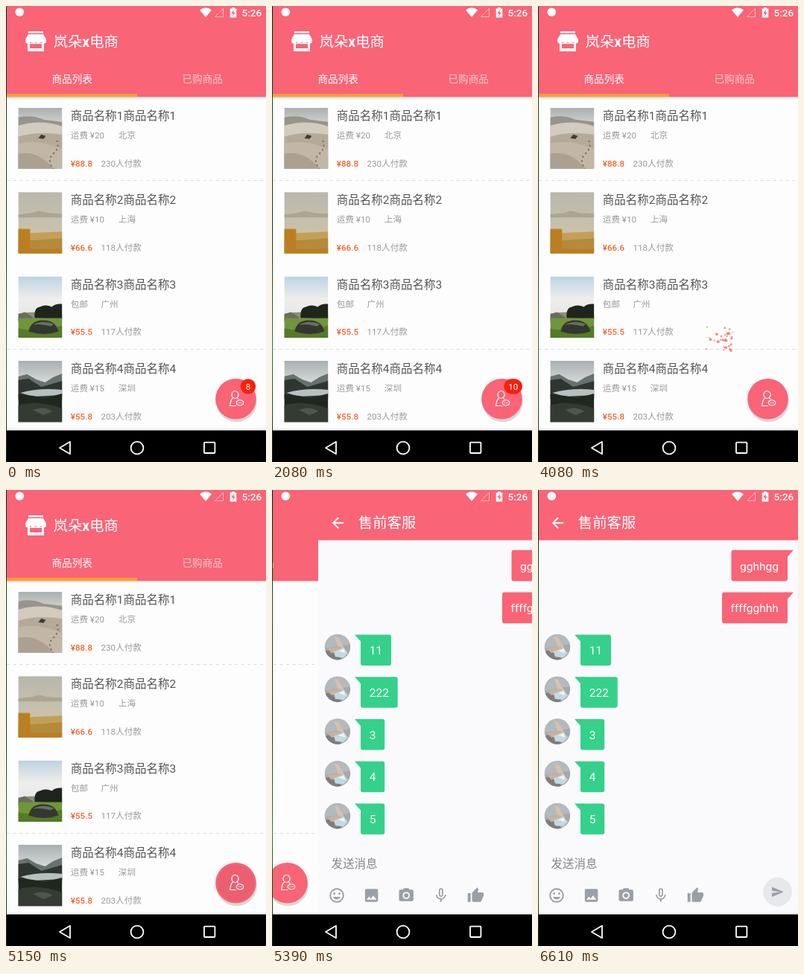
An HTML page for the animation above (8 s loop, 349 px wide and 613 px high).

```html
<!DOCTYPE html>
<html lang="zh-CN">
<head>
<meta charset="utf-8">
<title>Shop and chat</title>
<style>
html, body { margin: 0; width: 100%; height: 100%; overflow: hidden; background: #000; }
svg { display: block; width: 100%; height: 100%; }
text { font-family: Roboto, "Noto Sans CJK SC", "Noto Sans CJK", sans-serif; white-space: pre; }
</style>
</head>
<body>
<svg id="stage" viewBox="0 0 349 613" xmlns="http://www.w3.org/2000/svg"></svg>
<script>
const LOOP = 8000, W = 350;
const PINK = '#f96476', GREEN = '#35d18a', RED = '#f6210c', ICON = '#9a9fa8';

const rect = (x, y, w, h, fill, more = '') =>
  `<rect x="${x}" y="${y}" width="${w}" height="${h}" fill="${fill}" ${more}/>`;
const circle = (x, y, r, fill, more = '') =>
  `<circle cx="${x}" cy="${y}" r="${r}" fill="${fill}" ${more}/>`;
const path = (d, fill, more = '') => `<path d="${d}" fill="${fill}" ${more}/>`;
const line = (d, color, width, more = '') =>
  path(d, 'none', `stroke="${color}" stroke-width="${width}" ${more}`);
const text = (x, y, size, fill, str, more = '') =>
  `<text x="${x}" y="${y}" font-size="${size}" fill="${fill}" ${more}>${str}</text>`;
const group = (x, y, body, more = '') => `<g transform="translate(${x} ${y})" ${more}>${body}</g>`;

// 24-unit glyph centred on x, y
const glyph = (x, y, scale, fill, d) =>
  path(d, fill, `fill-rule="evenodd" transform="translate(${x} ${y}) scale(${scale}) translate(-12 -12)"`);

const glyphs = {
  back: 'M20 11H7.83l5.59-5.59L12 4l-8 8 8 8 1.41-1.41L7.83 13H20z',
  smile: 'M12 2a10 10 0 1 0 .01 0zM12 4a8 8 0 1 1-.01 0zM15.5 8a1.5 1.5 0 1 0 .01 0zM8.5 8a1.5 1.5 0 1 0 .01 0zM12 17.5c2.33 0 4.31-1.46 5.11-3.5H6.89c.8 2.04 2.78 3.5 5.11 3.5z',
  image: 'M21 19V5c0-1.1-.9-2-2-2H5c-1.1 0-2 .9-2 2v14c0 1.1.9 2 2 2h14c1.1 0 2-.9 2-2zM8.5 13.5l2.5 3L14.5 12l4.5 6H5z',
  camera: 'M9 2L7.17 4H4c-1.1 0-2 .9-2 2v12c0 1.1.9 2 2 2h16c1.1 0 2-.9 2-2V6c0-1.1-.9-2-2-2h-3.17L15 2zM12 7a5 5 0 1 1-.01 0zM12 8.8a3.2 3.2 0 1 0 .01 0z',
  mic: 'M12 14c1.66 0 3-1.34 3-3V5a3 3 0 0 0-6 0v6c0 1.66 1.34 3 3 3zM10.8 4.9a1.2 1.2 0 0 1 2.4 0v6.2a1.2 1.2 0 0 1-2.4 0zM17.3 11c0 3-2.54 5.1-5.3 5.1S6.7 14 6.7 11H5c0 3.41 2.72 6.23 6 6.72V21h2v-3.28c3.28-.48 6-3.3 6-6.72z',
  thumb: 'M1 21h4V9H1zM23 10c0-1.1-.9-2-2-2h-6.31l.95-4.57c.1-.5-.1-1-.41-1.38L14.17 1 7.59 7.59C7.22 7.95 7 8.45 7 9v10c0 1.1.9 2 2 2h9c.83 0 1.54-.5 1.84-1.22l3.02-7.05c.09-.23.14-.47.14-.73z',
  send: 'M2 21L23 12 2 3v7l15 2-15 2z'
};

const fade = (id, ...colors) => `<linearGradient id="${id}" x2="0" y2="1">` +
  colors.map((c, i) => `<stop offset="${i / (colors.length - 1)}" stop-color="${c}"/>`).join('') +
  '</linearGradient>';

const defs = `<defs>
  ${fade('drop', '#0003', '#0000')}
  ${fade('edge', '#0b2a12', '#184f1e', '#0d3b16', '#2a7a2c', '#0b2a12')}
  ${fade('sand', '#a9afb0', '#d8d6d0')}
  ${fade('haze', '#b9b6ac', '#c5c0ae', '#d6c59a')}
  ${fade('cloud', '#bcd3e2', '#eeeeec', '#e4e4e2')}
  ${fade('storm', '#a9afb1', '#e6e8e8')}
  <clipPath id="photo"><rect width="59" height="82.5"/></clipPath>
  <clipPath id="face"><circle r="17.2"/></clipPath>
  <filter id="soft" x="-30%" y="-30%" width="160%" height="160%"><feGaussianBlur stdDeviation=".7"/></filter>
</defs>`;

const photos = [
  rect(0, 0, 59, 24, 'url(#sand)') +
    path('M0 13Q18 9 34 16L59 19V82H0z', '#98948b') +
    path('M0 24Q30 15 59 25V82H0z', '#d2cbbe') +
    path('M0 39Q22 31 59 36V82H0z', '#b5aa99') +
    path('M0 48Q30 42 59 56V82H0z', '#c2b7a6') +
    path('M0 62Q26 56 48 82H0z', '#aca191') +
    path('M27 41l4-5 6 2-3 4z', '#3f3b36') +
    line('M52 44Q56 54 47 62T47 82', '#6f675b', 2, 'stroke-dasharray="2 4"'),
  rect(0, 0, 59, 82.5, 'url(#haze)') +
    path('M0 30L18 28 27 25 40 28 59 29V34H0z', '#aba591') +
    path('M0 49H15V55L59 53V82H0z', '#c3a057') +
    path('M0 66L59 62V82.5H0z', '#b48a3d') +
    path('M0 50H16V76H59V82.5H0z', '#bb7f22'),
  rect(0, 0, 59, 60, 'url(#cloud)') +
    path('M0 50Q20 46 59 50V62H0z', '#8a927a') +
    path('M22 56Q21 42 29 41 37 37 45 41 50 36 59 37V57z', '#1f251c') +
    path('M0 51L9 48 20 55V60H0z', '#6b6b60') +
    rect(0, 56, 59, 27, '#6f963a') +
    path('M0 70Q30 76 59 66V82.5H0z', '#547a2a') +
    path('M14 74Q16 61 30 59 50 57 54 74 34 81 14 74z', '#34372f') +
    path('M20 65Q32 58 48 64L44 67Q30 63 20 65z', '#6c6d62'),
  rect(0, 0, 59, 40, 'url(#storm)') +
    path('M0 21L12 18 24 25 36 29 47 22 59 17V48H0z', '#67716d') +
    path('M0 26L14 24 31 35 59 27V52H0z', '#2e3632') +
    path('M3 43Q28 36 59 39V46L20 48z', '#b9c0c0') +
    path('M0 45L20 47 36 50 59 44V82.5H0z', '#20271f') +
    path('M0 60Q24 52 59 64V82.5H0z', '#343b32') +
    path('M20 66Q34 60 46 68L34 73z', '#4f564c')
];

const goods = [['运费 ¥20', '北京', '¥88.8', 230], ['运费 ¥10', '上海', '¥66.6', 118],
  ['包邮', '广州', '¥55.5', 117], ['运费 ¥15', '深圳', '¥55.8', 203]];

function goodsRow([freight, city, price, sold], i) {
  const name = '商品名称' + (i + 1);
  return group(0, 136.8 + i * 113.4,
    group(16.4, 0, photos[i], 'clip-path="url(#photo)"') +
    text(86.8, 16.2, 15.5, '#555', name + name) +
    text(86.8, 41, 11.6, '#999', freight) +
    text(freight.length > 2 ? 150.8 : 127.5, 41, 11.6, '#999', city) +
    text(86.8, 78.8, 11.6, '#f2652b', price, 'font-weight="500"') +
    text(127.5, 78.8, 11.6, '#999', sold + '人付款'));
}

const dashes = y => line(`M1 ${y}H349`, '#dcdcdc', 1, 'stroke-dasharray="4.5 4"');

const shop = path('M30 34H50V36.5H30zM30 38H50L54 45V47A3.5 3.5 0 0 1 47 47A3.5 3.5 0 0 1 40 47A3.5 3.5 0 0 1 33 47A3.5 3.5 0 0 1 26 47V45z', '#fff') +
  path('M29 50H51V61H29zM32 51V57H48V51z', '#fff', 'fill-rule="evenodd"');

const fab = circle(309.5, 532, 27.3, '#00000026', 'filter="url(#soft)"') +
  circle(308.5, 528.3, 27.3, PINK) +
  '<circle id="ripple" cx="308.5" cy="528.3" fill="#000"/>' +
  line('M307.5 517.5a4.6 5 0 1 0 .01 0zM304.5 527Q301 530 300.8 537.5H309M310.5 527L312 528.5', '#fff', 1.2) +
  line('M314 529.8a5 3.6 0 1 0 .01 0zM311.4 533.4h1M313.6 533.4h1M315.8 533.4h1', '#fff', 1.1);

const home = rect(0, 0, W, 571, '#fdfdfe') +
  goods.map(goodsRow).join('') + dashes(234.5) + dashes(461.5) +
  rect(0, 122, W, 3, 'url(#drop)') + rect(0, 0, W, 122, PINK) + shop +
  text(63.5, 54.5, 19.4, '#fff', '岚朵<tspan font-weight="700">x</tspan>电商') +
  text(61.5, 103, 13.6, '#fff', '商品列表') +
  text(236.5, 103, 13.6, '#fff', '已购商品', 'opacity=".65"') +
  rect(0, 118, 176, 4, '#fc9d33') + fab + '<g id="badge"></g>';

const avatar = y => group(26, y, rect(-18, -18, 36, 36, '#a5a8ac') +
  path('M-18 -18H18V-4L-18 2z', '#b4b9be') +
  path('M-18 6L-2 2 6 18H-18z', '#7f7d7e') +
  path('M-4 -14L1 -13 10 3 3 7z', '#d8c0ab') +
  path('M-14 2L4 -1 8 4 -8 8z', '#cbb19c') +
  path('M-5 6L8 1 14 8 8 14 -3 13z', '#bfdbe3') +
  path('M1 5L9 2 10 8z', '#eef4f5'), 'clip-path="url(#face)"');

const sent = (x, y, str) => rect(x, y, 335 - x, 41.7, PINK, 'rx="3"') +
  path(`M331 ${y}H343L335 ${y + 9}L331 ${y + 9}z`, PINK) +
  text(x + 11.5, y + 26.8, 15.5, '#fff', str);

function received(str, i) {
  const y = 194.4 + i * 56.75;
  return avatar(y + 16.8) + rect(57, y, 23.5 + str.length * 8.75, 41.7, GREEN, 'rx="3"') +
    path(`M49 ${y}H61V${y + 9}H57z`, GREEN) + text(68.8, y + 26.8, 15.5, '#fff', str);
}

const chat = rect(0, 0, W, 571, '#fafafc') + rect(0, 0, W, 67.5, PINK) +
  glyph(26.5, 44.3, .97, '#fff', glyphs.back) +
  text(53.8, 51.3, 19.4, '#fff', '售前客服') +
  sent(259.5, 80.8, 'gghhgg') + sent(247, 137.6, 'ffffgghhh') +
  ['11', '222', '3', '4', '5'].map(received).join('') +
  text(17.5, 507.5, 15.5, '#858585', '发送消息') +
  ['smile', 'image', 'camera', 'mic', 'thumb'].map((name, i) =>
    glyph(25 + i * 46.6, 545, .97, ICON, glyphs[name])).join('') +
  circle(321.5, 540.3, 19.4, '#e7e8ec') + glyph(321.5, 540.3, .75, ICON, glyphs.send) +
  '<rect id="bar" x="345" y="350" width="4" height="123" fill="#000"/>';

const status = circle(18.3, 8.2, 5.8, '#fff') +
  path('M260 5.5Q268 -1 276 5.5L268 15z', '#fff') +
  line('M291.5 3.5V14.5H280.5z', '#fff', 1, 'opacity=".55"') +
  path('M303 2H307V3.5H309.3V15.5H300.7V3.5H303zM305.8 5L302.5 10H304.5V14L307.6 8.8H305.6z', '#fff', 'fill-rule="evenodd"') +
  text(316.5, 13.6, 13.6, '#fff', '5:26', 'font-weight="500"');

const nav = rect(0, 567, W, 4, '#f4f4f6') + rect(0, 570.5, W, 43, '#000') +
  line('M72 594L86 585.8V602.2z', '#fff', 1.8, 'stroke-linejoin="round"') +
  circle(176, 594, 8.4, 'none', 'stroke="#fff" stroke-width="1.8"') +
  rect(266, 586.6, 14.4, 14.4, 'none', 'stroke="#fff" stroke-width="1.8" rx="1"');

document.getElementById('stage').innerHTML = defs +
  `<g id="home">${home}</g><g id="chat">${chat}</g>` + status + nav + rect(0, 0, 1, 613, 'url(#edge)');

const el = id => document.getElementById(id);
const [homeEl, chatEl, badgeEl, rippleEl, barEl] = ['home', 'chat', 'badge', 'ripple', 'bar'].map(el);

const clamp = v => Math.min(1, Math.max(0, v));
const span = (t, from, to) => clamp((t - from) / (to - from));
const hold = (t, from, step) => from + Math.floor((t - from) / step + 1e-6) * step;

const REST = [323.7, 511.5], DROP = [243, 448.5];
const SNAP = 84;

let seed = 7;
const random = () => (seed = seed * 16807 % 2147483647) / 2147483647;
const sparks = Array.from({ length: 30 }, () => ({
  x: random() * 20 - 10, y: random() * 18 - 9, grow: 1 + random() * 1.3, r: 1 + random() * 1.8
}));

function pill([x, y], label) {
  const w = label.length > 1 ? 24.6 : 20.4;
  return rect(x - w / 2, y - 10.2, w, 20.4, RED, 'rx="10.2"') +
    text(x, y + 4.1, 11.6, '#fff', label, 'text-anchor="middle"');
}

// Sticky neck between the resting point and the dragged badge
function neck([ox, oy], [bx, by]) {
  const d = Math.hypot(bx - ox, by - oy);
  if (d < 1 || d > SNAP) return '';
  const nx = (oy - by) / d, ny = (bx - ox) / d;
  const r = 10 * (1 - .65 * d / SNAP);
  const mid = `${(ox + bx) / 2} ${(oy + by) / 2}`;
  const at = (x, y, k) => `${x + nx * k} ${y + ny * k}`;
  return circle(ox, oy, r, RED) +
    path(`M${at(ox, oy, r)}Q${mid} ${at(bx, by, 10)}L${at(bx, by, -10)}Q${mid} ${at(ox, oy, -r)}z`, RED);
}

function badge(t) {
  if (t < 1230) return pill([325, 511.5], '8');
  if (t < 1620) return pill([325, 511.5], '9');
  if (t < 3190) return pill(REST, '10');
  if (t < 4020) {
    const p = 1 - (1 - span(hold(t, 3190, 370 / 7), 3190, 3960)) ** 2;
    const pos = REST.map((v, i) => v + (DROP[i] - v) * p);
    return neck(REST, pos) + pill(pos, '10');
  }
  if (t >= 4200) return '';
  const u = span(hold(t, 3960, 60), 3960, 4200);
  return sparks.map(s => {
    const k = 1 + s.grow * u;
    return circle(DROP[0] + s.x * k, DROP[1] + s.y * k, s.r * (1 - u * .5), RED, `opacity="${1 - u}"`);
  }).join('');
}

let lastBadge;
function draw(t) {
  const markup = badge(t);
  if (markup !== lastBadge) badgeEl.innerHTML = lastBadge = markup;

  const q = hold(t, 4850, 60);
  const x = Math.round(W * (1 - Math.cos(Math.PI * span(q, 5194, 5465))) / 2);
  homeEl.setAttribute('transform', `translate(${-x} 0)`);
  chatEl.setAttribute('transform', `translate(${W - x} 0)`);

  rippleEl.setAttribute('r', 25 * span(q, 4800, 5090));
  rippleEl.setAttribute('opacity', t < 4860 ? 0 : .05 * (1 - span(q, 5270, 5390)));
  barEl.setAttribute('opacity', .25 * (1 - span(hold(t, 6380, 57.5), 6322, 6610)));
}

const start = performance.now();
function tick() {
  draw((performance.now() - start) % LOOP);
  requestAnimationFrame(tick);
}
tick();
</script>
</body>
</html>
```
